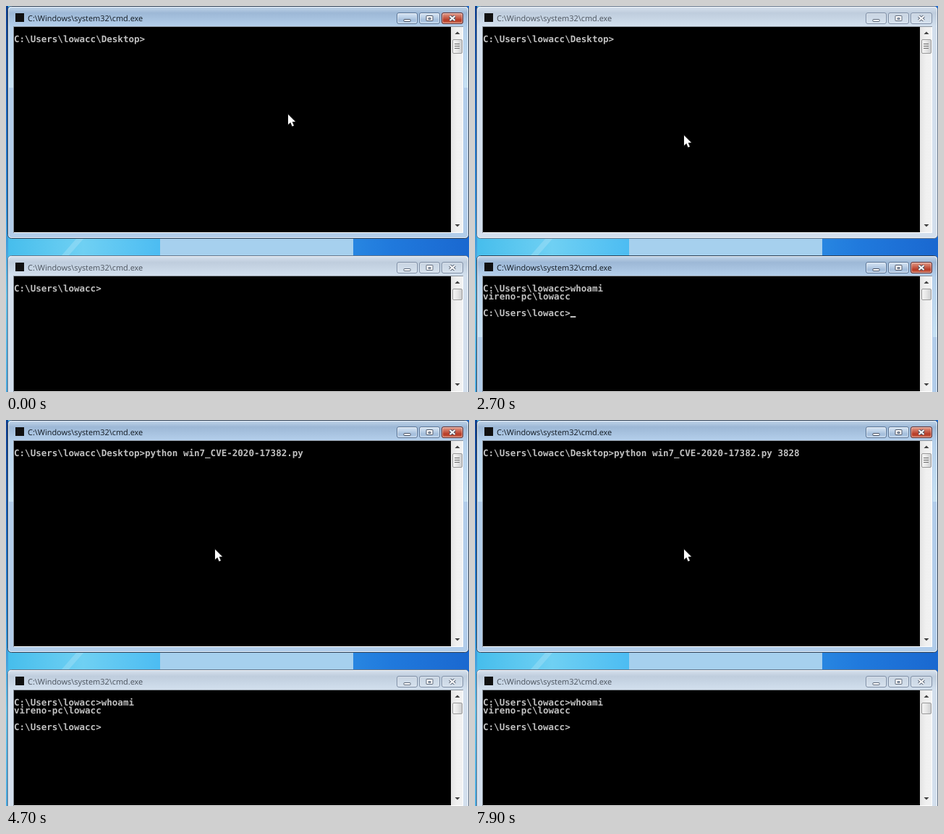
An HTML page with a canvas that plays this animation: 640 px wide and 534 px high, repeating every 8000 ms.

```html
<!DOCTYPE html>
<html>
<head>
<meta charset="utf-8">
<style>
html, body { margin: 0; width: 100%; height: 100%; overflow: hidden; background: #1a6cc8; }
canvas { display: block; }
</style>
</head>
<body>
<canvas id="stage" width="640" height="534"></canvas>
<script>
const c = document.getElementById('stage').getContext('2d');
const LOOP = 8000, CHAR = 7.55, LINE = 11.35;
const USER = 'C:\\Users\\lowacc';
const TITLE = 'C:\\Windows\\system32\\cmd.exe';
const SCRIPT = 'win7_CVE-2020-17382.py';

// Periods when the blinking text caret is visible
const caretOn = [[700, 1100], [1900, 2200], [2600, 2900], [3300, 3600], [5100, 5500], [6000, 6300], [6800, 7300]];

function rect(x, y, w, h, fill) {
  c.fillStyle = fill;
  c.fillRect(x, y, w, h);
}

// Evenly spaced colour stops
function gradient(x0, y0, x1, y1, colors) {
  const g = c.createLinearGradient(x0, y0, x1, y1);
  colors.forEach((col, i) => g.addColorStop(i / (colors.length - 1), col));
  return g;
}

function box(x, y, w, h, r, fill, stroke) {
  c.beginPath();
  c.roundRect(x + .5, y + .5, w - 1, h - 1, r);
  if (fill) { c.fillStyle = fill; c.fill(); }
  if (stroke) { c.strokeStyle = stroke; c.lineWidth = 1; c.stroke(); }
}

function path(points, fill, stroke, width = 1) {
  c.beginPath();
  points.forEach(([x, y]) => c.lineTo(x, y));
  c.closePath();
  c.lineWidth = width;
  c.lineJoin = 'miter';
  if (stroke) { c.strokeStyle = stroke; c.stroke(); }
  if (fill) { c.fillStyle = fill; c.fill(); }
}

function desktop() {
  rect(0, 0, 640, 534, gradient(0, 0, 640, 0,
    ['#45bdec', '#6fd0f3', '#4cbcf2', '#38a6ee', '#2f92e6', '#2079dc', '#1a68d0']));
  rect(0, 0, 3, 534, gradient(0, 0, 0, 534, ['#0d3f92', '#1a62ba', '#2b86d2', '#5fbde6', '#4aa8dd']));
  path([[76, 346], [98, 321], [108, 321], [86, 346]], 'rgba(255,255,255,.18)');
  rect(213, 200, 267, 267, '#a6d0ee');
}

function button(x, y, w, kind, active) {
  const close = kind === 'close';
  const fill = !active ? 'rgba(255,255,255,.15)'
    : gradient(0, y, 0, y + 16, close
      ? ['#e5a594', '#d0705c', '#b63a25', '#d3775c']
      : ['#d9e6f4', '#c2d5ea', '#a3bddb', '#bdd4ec']);
  box(x, y, w, 16, 2.5, fill, active ? (close ? '#5f2a2c' : '#5c7697') : '#7f8fa6');
  box(x + 1, y + 1, w - 2, 14, 2, null, `rgba(255,255,255,${active ? .45 : .25})`);
  const ink = active ? '#4c5566' : '#5f6a7b';
  const mx = x + w / 2, my = y + 8;
  if (kind === 'min') {
    box(mx - 5, my + 1, 10, 4, .5, '#fff', ink);
  } else if (kind === 'max') {
    box(mx - 5, my - 4, 10, 8, .5, '#fff', ink);
    box(mx - 2, my - 1, 4, 3, 0, '#b6c8dd', ink);
  } else {
    for (const [width, col] of [[4.2, ink], [2, '#fff']]) {
      c.beginPath();
      c.moveTo(mx - 3.5, my - 3); c.lineTo(mx + 3.5, my + 3);
      c.moveTo(mx + 3.5, my - 3); c.lineTo(mx - 3.5, my + 3);
      c.lineWidth = width; c.strokeStyle = col; c.stroke();
    }
  }
}

function scrollbar(y, bottom, thumb) {
  rect(615, y, 16, bottom - y, gradient(615, 0, 631, 0, ['#e3e3e3', '#f0f0f0', '#f2f2f2']));
  path([[620.5, y + 10], [624, y + 6.5], [627.5, y + 10]], '#404040');
  path([[620.5, bottom - 11], [624, bottom - 7.5], [627.5, bottom - 11]], '#404040');
  box(617, y + 17, 14, thumb, 1.5, gradient(617, 0, 631, 0, ['#f6f6f6', '#e6e6e6', '#c9cacc']), '#999');
  if (thumb > 18) for (let i = 0; i < 3; i++) rect(620, y + 23 + i * 3, 7, 1, '#6c6c6c');
}

function consoleWindow(y, h, thumb, active, lines, caret) {
  const bottom = y + h;
  box(2, y, 638, h, 5, active ? '#b2cdea' : '#d3dfed', active ? '#2c3e54' : '#65758a');
  c.save();
  c.beginPath();
  c.roundRect(3, y + 1, 636, h - 2, 4);
  c.clip();
  rect(3, y, 636, 29, gradient(0, y, 0, y + 29, active
    ? ['#c6d8eb', '#9db8d6', '#a9c4e1', '#b5d0ec']
    : ['#d9e3ef', '#bfcddd', '#c9d7e6', '#d4e1ef']));
  if (active) {
    for (const x of [4, 633]) rect(x, y + 29, 6, 84, gradient(0, y + 29, 0, y + 113, ['#b7d1eb', '#c8e2f4']));
  }
  c.restore();
  box(3, y + 1, 636, h - 2, 4, null, 'rgba(255,255,255,.65)');

  // Sunken edge: dark above and left, light below and right
  rect(10, y + 28, 622, h - 36, '#8d959e');
  rect(11, y + 29, 621, h - 37, '#fff');
  rect(11, y + 29, 604, h - 38, '#000');
  scrollbar(y + 29, bottom - 9, thumb);

  rect(13, y + 10, 12, 12, '#101010');
  c.font = '10.93px "Open Sans", "Noto Sans", sans-serif';
  c.fillStyle = active ? '#101820' : '#4a525c';
  c.fillText(TITLE, 30, y + 20.5);
  button(540, y + 9, 29, 'min', active);
  button(571, y + 9, 29, 'max', active);
  button(602, y + 9, 30, 'close', active);

  c.font = 'bold 12.54px "DejaVu Sans Mono", monospace';
  c.fillStyle = '#c0c0c0';
  lines.forEach((line, i) => c.fillText(line, 11, y + 50 + i * LINE));
  if (caret) {
    const last = lines.length - 1;
    rect(11 + lines[last].length * CHAR, Math.round(y + 50 + last * LINE), CHAR, 2, '#c0c0c0');
  }
}

function typed(text, t, start, step) {
  return text.slice(0, Math.max(0, Math.floor((t - start) / step)));
}

function command(t) {
  if (t < 4500) return typed('python w', t, 3500, 100);
  return 'python ' + SCRIPT + typed(' 38', t, 5400, 200) + typed('28', t, 6100, 200);
}

function glide(t, start, end, a, b) {
  const p = Math.min(1, Math.max(0, (t - start) / (end - start)));
  const e = p * p * (3 - 2 * p);
  return a.map((v, i) => v + (b[i] - v) * e);
}

function pointer(t) {
  const [x, y] = t < 2100
    ? glide(t, 0, 500, [390, 150], [339, 451])
    : glide(t, 2100, 2600, [339, 451], [289, 179]);
  const shape = [[0, 0], [0, 14], [3.2, 11], [5.6, 16.4], [7.9, 15.4], [5.6, 10.2], [10, 10]];
  path(shape.map(([dx, dy]) => [x + dx, y + dy]), '#fff', '#111', 1.6);
}

function draw(now) {
  const t = Math.floor(now % LOOP / 100) * 100;
  const lowerActive = t >= 400 && t < 3000;
  const caret = caretOn.some(([a, b]) => t >= a && t < b);
  const lower = [USER + '>' + typed('whoami', t, 1000, 100)];
  if (t >= 1900) lower.push('vireno-pc\\lowacc', '', USER + '>');

  c.textRendering = 'geometricPrecision';
  desktop();
  consoleWindow(0, 322, 20, !lowerActive, [USER + '\\Desktop>' + command(t)], caret && !lowerActive);
  consoleWindow(345, 197, 16, lowerActive, lower, caret && lowerActive);
  pointer(t);
  requestAnimationFrame(draw);
}
requestAnimationFrame(draw);
</script>
</body>
</html>
```
